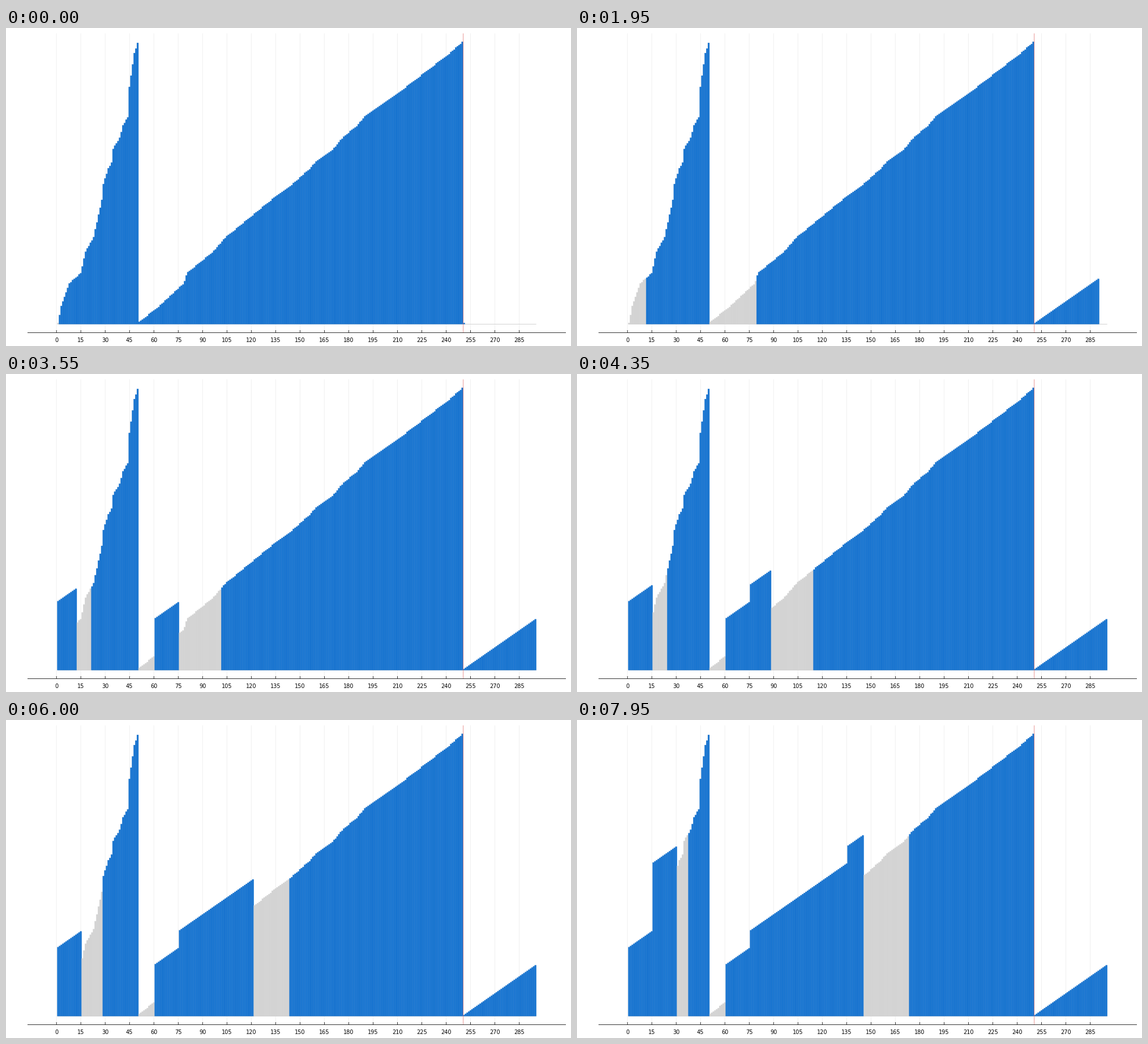
These frames come from a looping animation (998 by 561 pixels, 8 s). A matplotlib script:

```python
from collections import deque

import numpy as np
import matplotlib.pyplot as plt
from matplotlib.animation import FuncAnimation
from matplotlib.collections import PolyCollection

W, H, DPI = 998, 561, 100
PT = 72 / DPI               # one pixel in points
X0, DX = 89.145, 2.868      # slot 0 centre, slot pitch
BASE, DY = 522.3, 1.992     # bar baseline, pixels per unit of value
N, SPLIT, BLOCK = 250, 50, 15
BUFFER = 3 * BLOCK
SLOTS, FRAMES = N + BUFFER, 160
FILL = {False: "#1976d2", True: "#d3d3d3"}
EDGE = {False: "#1a70c7", True: "#d3d3d3"}

# The short run follows a bent line; the long run holds all other values.
KNOTS = [(1, 1), (3, 16), (8, 36), (15, 45), (18, 64), (23, 77), (28, 110),
         (29, 124), (32, 138), (34, 143), (35, 155), (39, 165), (41, 176),
         (44, 183), (45, 210), (48, 240), (50, 249)]


def make_runs():
    short = np.round(np.interp(np.arange(1, SPLIT + 1), *zip(*KNOTS)))
    rest = np.setdiff1d(np.arange(1, N + 1), short)
    return np.concatenate([short, rest]).astype(int)


def plan_moves(runs):
    """Merge in value order: fill the buffer, then blocks as they come free."""
    origin = {v: slot for slot, v in enumerate(runs, 1)}
    free = deque(range(N + 1, SLOTS + 1))
    left = {}
    moves = []
    for v in range(1, FRAMES + 1):
        slot = origin[v]
        moves.append((slot, free.popleft()))
        block = (slot - 1) // BLOCK
        left[block] = left.get(block, BLOCK) - 1
        if left[block] == 0:
            start = block * BLOCK + 1
            free.extend(range(start, start + BLOCK))
    return moves


RUNS = make_runs()
MOVES = plan_moves(RUNS)


def state(count):
    """Value of each slot, and whether it has been moved away."""
    values = np.zeros(SLOTS + 1, int)
    values[1:N + 1] = RUNS
    taken = np.zeros(SLOTS + 1, bool)
    for v, (src, dst) in enumerate(MOVES[:count], 1):
        taken[src] = True
        values[dst] = v
        taken[dst] = False
    return values, taken


def px(slot):
    return X0 + DX * slot


def bar(slot, value):
    l, r, top = px(slot - 0.5), px(slot + 0.5), BASE - DY * value
    return [(l, BASE), (l, top), (r, top), (r, BASE)]


def line(x, y, color, z, width=1.0):
    ax.plot(x, y, color=color, lw=width * PT, zorder=z, snap=False,
            solid_capstyle="butt")


fig = plt.figure(figsize=(W / DPI, H / DPI), dpi=DPI, facecolor="white")
ax = fig.add_axes([0, 0, 1, 1])
ax.set_xlim(0, W)
ax.set_ylim(H, 0)
ax.axis("off")

for tick in range(0, 286, 15):
    x = px(tick)
    line([x, x], [9.5, 537], "#f0f0f0", 1)
    line([x, x], [533, 537.5], "black", 5, 0.8)
    ax.text(x, 554, str(tick), ha="center", va="baseline", fontsize=7,
            family="DejaVu Sans", color="black")

line([px(0.5), px(SLOTS + 0.5)], [522.5, 522.5], "#d3d3d3", 2)
line([px(N + 0.5)] * 2, [9.5, 537], "#e26f6aB3", 4)
line([38, 989], [537.5, 537.5], "black", 5, 0.8)

bars = PolyCollection([], linewidths=0.4 * PT, zorder=3)
bars.set_snap(False)
ax.add_collection(bars, autolim=False)


def draw(frame):
    values, taken = state(frame + 1)
    shown = np.flatnonzero(values)
    bars.set_verts([bar(s, values[s]) for s in shown])
    bars.set_facecolor([FILL[bool(taken[s])] for s in shown])
    bars.set_edgecolor([EDGE[bool(taken[s])] for s in shown])
    return [bars]


anim = FuncAnimation(fig, draw, frames=FRAMES, init_func=lambda: draw(0),
                     interval=50, repeat=True, repeat_delay=0)
plt.show()
```
